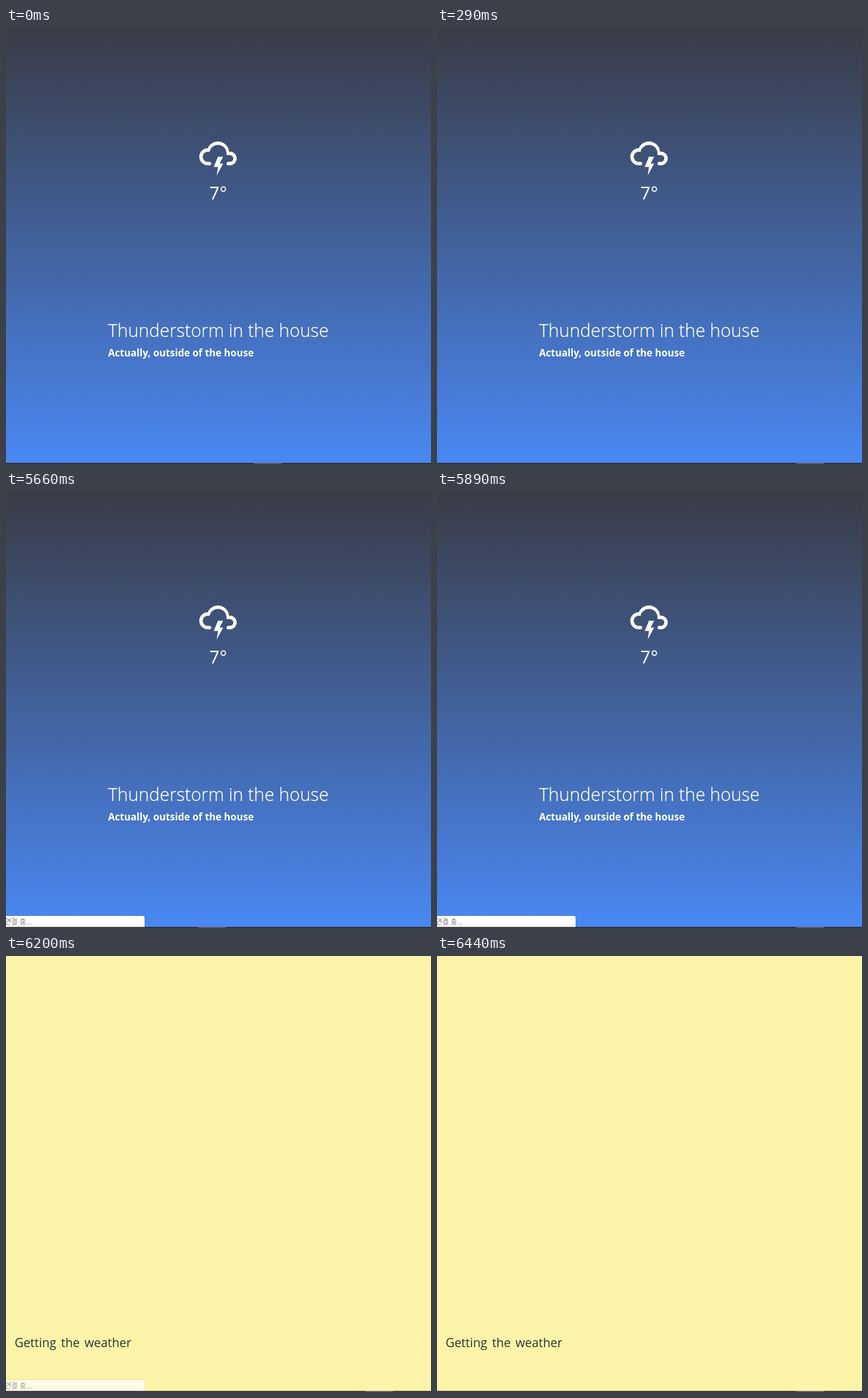
These frames come from a looping animation (739 px wide and 758 px high, 8 s). An HTML page:

```html
<!DOCTYPE html>
<html lang="en">
<head>
<meta charset="utf-8">
<title>Weather</title>
<style>
  html, body { margin: 0; width: 100%; height: 100%; overflow: hidden; }
  svg { display: block; width: 739px; height: 758px; }
  text { font-family: "Open Sans", "Noto Sans", sans-serif; }
  .temp { font-size: 31px; text-anchor: middle; }
  .title { font-size: 31.1px; font-weight: 300; stroke: #fff; stroke-width: .3px; }
  .subtitle { font-size: 17.1px; font-weight: 700; }
  .loading { font-size: 21.2px; word-spacing: 3px; }
  .status { font: 12px "Noto Sans CJK KR", "Noto Sans CJK", sans-serif; word-spacing: 1px; }
</style>
</head>
<body>
<svg viewBox="0 0 739 758">
  <defs>
    <linearGradient id="sky" x2="0" y2="1">
      <stop stop-color="#393c45"/>
      <stop offset="1" stop-color="#4a88f4"/>
    </linearGradient>
  </defs>

  <g id="weather" fill="#fff">
    <rect width="739" height="758" fill="url(#sky)"/>
    <path transform="translate(333.1 191.3) scale(2.96)" d="M6 16A5 5 0 0 1 6 6C7 3.65 9.3 2 12 2C15.43 2 18.24 4.66 18.5 8.03L19 8A4 4 0 0 1 19 16H18A1 1 0 0 1 18 14H19A2 2 0 0 0 19 10H17V9A5 5 0 0 0 12 4C9.5 4 7.45 5.82 7.06 8.19C6.73 8.07 6.37 8 6 8A3 3 0 0 0 6 14H7A1 1 0 0 1 7 16ZM12 11H15L13 15H15L11.25 22L12 17H9.5Z"/>
    <text class="temp" x="369" y="298">7°</text>
    <text class="title" x="177.5" y="537">Thunderstorm in the house</text>
    <text class="subtitle" x="177.5" y="571">Actually, outside of the house</text>
  </g>

  <g id="loading">
    <rect width="739" height="758" fill="#fcf4a8"/>
    <text class="loading" x="15" y="680" fill="#2c3234">Getting the weather</text>
  </g>

  <g id="status">
    <rect x="-5.5" y="736.5" width="247" height="30" rx="3.5" fill="#000" fill-opacity=".2"/>
    <rect x="-5" y="737" width="246" height="30" rx="3" fill="#fff"/>
    <text class="status" x="-2" y="752" fill="#777">연결 중...</text>
  </g>

  <rect y="756" width="739" height="2" fill="#2b2024" fill-opacity=".85"/>
  <rect id="handle" y="756" width="48" height="2" fill="#fff" fill-opacity=".22"/>
</svg>
<script>
  const LOOP = 8000;
  const [weather, loading, popup, handle] =
    ['weather', 'loading', 'status', 'handle'].map(id => document.getElementById(id));
  const show = (node, on) => node.setAttribute('visibility', on ? 'visible' : 'hidden');

  function handleX(t) {
    if (t < 290) return 431;
    return t >= 3800 && t < 5890 ? 334 : 625;
  }

  function popupOpacity(t) {
    if (t < 5660) return 0;
    if (t < 6200) return 1;
    // fades out in four steps of 80 ms
    return Math.max(0, 0.75 - 0.25 * Math.floor((t - 6200) / 80));
  }

  function draw(t) {
    show(weather, t < 5980);
    show(loading, t >= 5980);
    popup.setAttribute('opacity', popupOpacity(t));
    handle.setAttribute('x', handleX(t));
  }

  const start = performance.now();
  function tick() {
    draw((performance.now() - start) % LOOP);
    requestAnimationFrame(tick);
  }
  tick();
</script>
</body>
</html>
```
